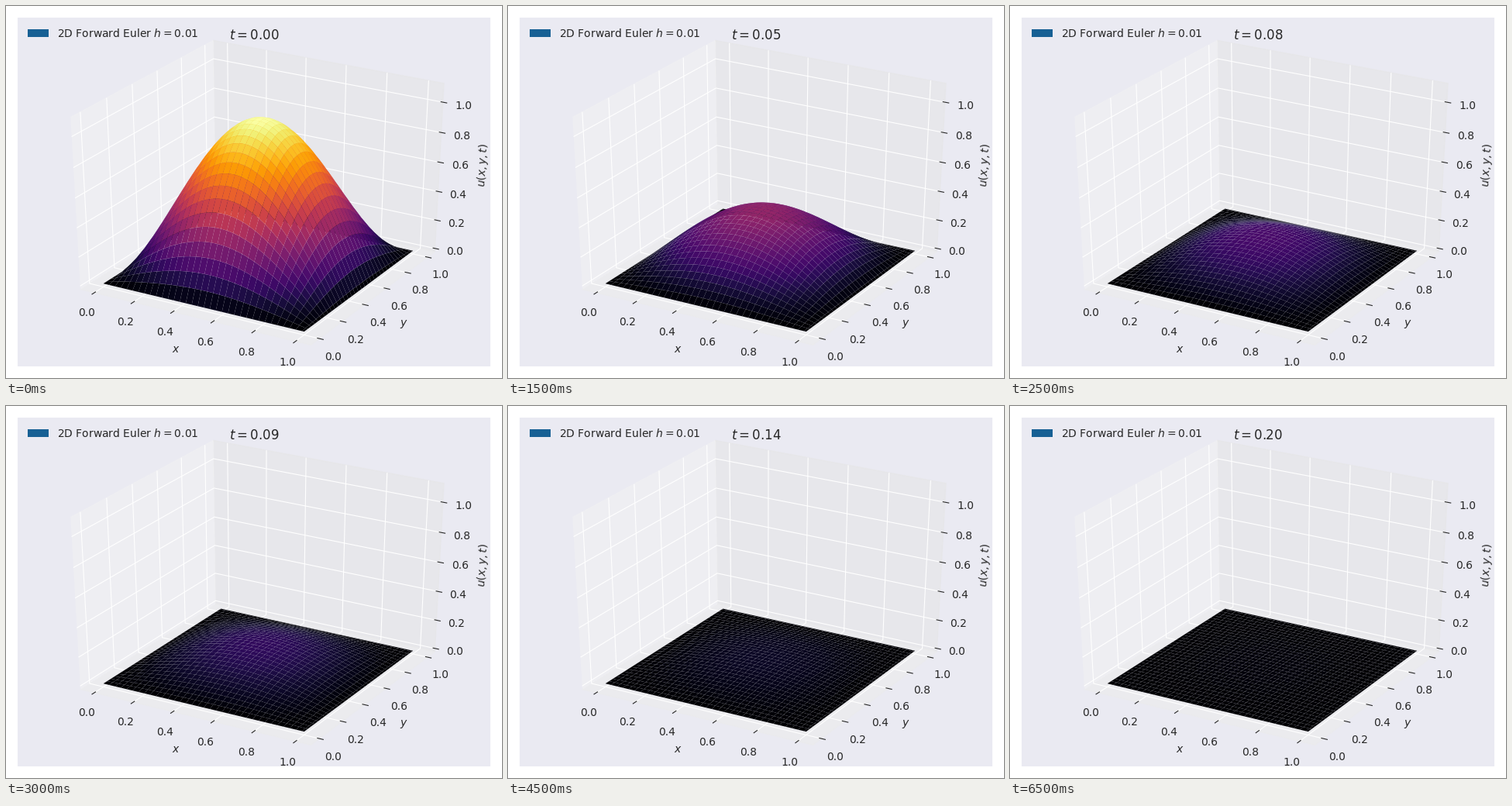
A matplotlib script that plays this animation: 640 px wide and 480 px high, repeating every 7 s.

```python
import numpy as np
import matplotlib.pyplot as plt
from matplotlib.animation import FuncAnimation
from matplotlib.patches import Patch

W, H, DPI = 640, 480, 100
FRAMES, INTERVAL = 14, 500
T_END = 0.2
PAD = 15  # white border around the axes, px

plt.rcParams.update({
    "font.family": "DejaVu Sans",
    "axes.facecolor": "#EAEAF2",
    "axes.edgecolor": "white",
    "axes.labelcolor": ".15",
    "axes.linewidth": 0,
    "grid.color": "white",
    "grid.linestyle": "-",
    "text.color": ".15",
    "xtick.color": ".15",
    "ytick.color": ".15",
    "legend.frameon": False,
})

fig = plt.figure(figsize=(W / DPI, H / DPI), dpi=DPI, facecolor="white")
ax = fig.add_axes([PAD / W, PAD / H, 1 - 2 * PAD / W, 1 - 2 * PAD / H],
                  projection="3d")

# Unit cube stretched over the whole rectangle instead of a square box
ax.apply_aspect = lambda *args, **kwargs: None
ax.set_box_aspect((1, 1, 1), zoom=np.sqrt(3) / 1.8294640721620434)
ax.view_init(elev=30, azim=-60)


def padded(lo, hi):
    margin = (hi - lo) / 48
    return lo - margin, hi + margin


ticks = np.arange(6) / 5
ax.set(xlim=padded(-0.05, 1.05), ylim=padded(-0.05, 1.05),
       zlim=padded(0, 1.1), xticks=ticks, yticks=ticks, zticks=ticks)
ax.set_xlabel("$x$")
ax.set_ylabel("$y$")
ax.set_zlabel("$u(x,y,t)$")
ax.legend(handles=[Patch(facecolor="#176094", edgecolor="none",
                         label="2D Forward Euler $h = 0.01$")],
          loc="upper left")
title = ax.set_title("", y=1.0)

grid = np.linspace(0, 1, 101)
X, Y = np.meshgrid(grid, grid)
U0 = np.sin(np.pi * X) * np.sin(np.pi * Y)
surface = None


def draw(i):
    """Heat equation on the unit square: the first mode decays exponentially."""
    global surface
    if surface is not None:
        surface.remove()
    t = T_END * i / (FRAMES - 1)
    u = U0 * np.exp(-2 * np.pi**2 * t)
    surface = ax.plot_surface(X, Y, u, cmap="inferno", vmin=0, vmax=1,
                              rstride=3, cstride=3)
    title.set_text(f"$t = {t:.2f}$")
    return surface, title


anim = FuncAnimation(fig, draw, frames=FRAMES, interval=INTERVAL,
                     init_func=lambda: draw(0), repeat=True, repeat_delay=0)
plt.show()
```
